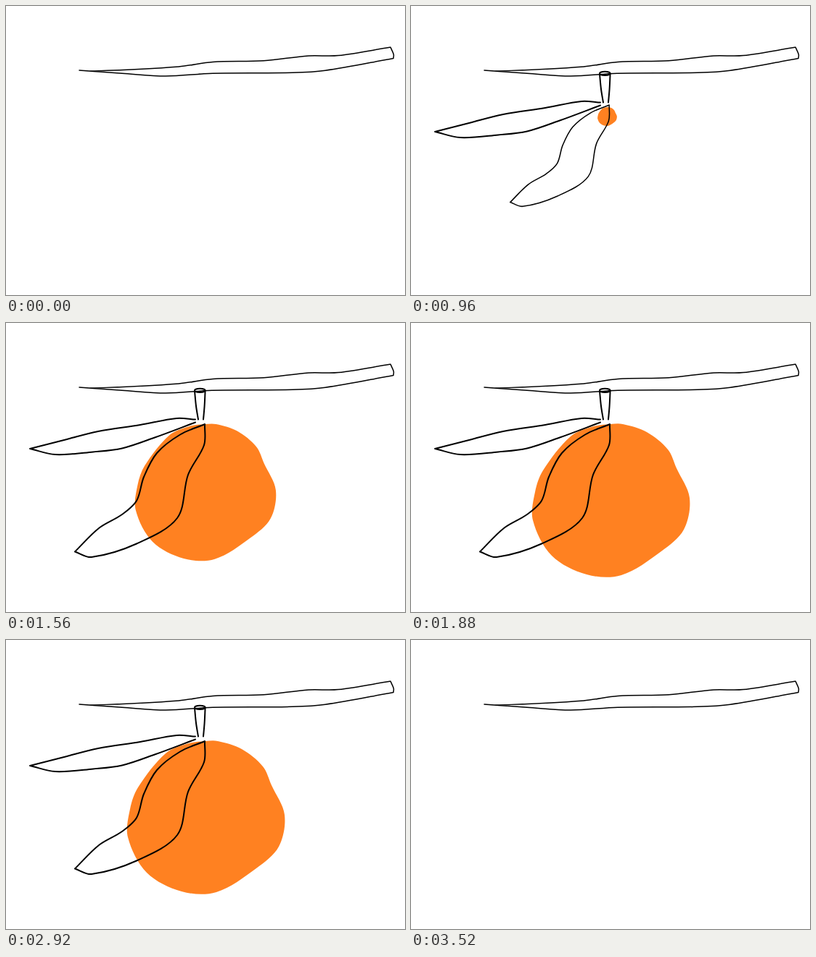
An HTML page that plays this animation: 550x400 px, repeating every 4 s.

```html
<!DOCTYPE html>
<html lang="en">
<head>
<meta charset="utf-8">
<title>Orange on a branch</title>
<style>
  html, body { margin: 0; width: 100%; height: 100%; overflow: hidden; background: #fff; }
  svg { display: block; width: 550px; height: 400px; }
  g { fill: none; stroke: #000; stroke-linecap: round; stroke-linejoin: round; }
  #branch { stroke-width: 1.5; }
  #orange { fill: #ff8121; stroke: none; }
</style>
</head>
<body>
<svg viewBox="0 0 550 400">
  <g>
    <path id="branch"/>
    <g id="fruit">
      <path id="orange"/>
      <g id="stem">
        <ellipse cx="267.3" cy="93.3" rx="7.3" ry="2.6"/>
        <path id="twig"/>
      </g>
      <path id="leaf"/>
    </g>
  </g>
</svg>
<script>
const STEP = 40, STEPS = 100;
const SHAKE = 65, REST = 73, FALL = 81, GONE = 88;
const $ = id => document.getElementById(id);

// Smooth curve through key points; handles follow the length of each span.
function curve(points, closed) {
  const p = points.trim().split(/\s+/).map(s => s.split(',').map(Number));
  const n = p.length;
  const at = i => closed ? p[(i + n) % n] : p[Math.max(0, Math.min(n - 1, i))];
  const dist = (a, b) => Math.hypot(a[0] - b[0], a[1] - b[1]);
  const handle = (prev, from, to) => {
    const span = dist(from, to);
    const k = span / (span + dist(prev, from)) / 3;
    return from.map((v, j) => v + (to[j] - prev[j]) * k);
  };
  let d = 'M' + p[0];
  for (let i = 0; i < (closed ? n : n - 1); i++) {
    const [a, b, c, e] = [at(i - 1), at(i), at(i + 1), at(i + 2)];
    d += `C${handle(a, b, c)} ${handle(e, c, b)} ${c}`;
  }
  return d;
}

const shape = (id, ...strokes) => $(id).setAttribute('d', strokes.map(s => curve(s)).join(''));

shape('branch',
  '101,89 122,90 238,84 285,77.4 355,75.8 417,69 458,68.6 530,57',
  '530,57 534.3,67 534,72.5',
  '101,89 160,93.2 220,97 285,93.2 395,92.3 440,89.3 534,72.5');

shape('twig',
  '260,94 262,115 265,133.5',
  '274.6,94 273.6,115 272,133.5',
  '261,133.5 235,132 185,141 127,150 80,162 33,174',
  '33,174 68,182 120,178.5 160,173.5 205,158.5 261,137.5');

shape('leaf',
  '274,140 240,154.5 208,180 190,213 180,246 160,265 128,284 95,316.5',
  '95,316.5 118,324 180,305.5 236,270 251,210 273,169 274,140');

$('orange').setAttribute('d', curve(`275,140 292,140 325,151 354,175 366,201 384,242 376,286
  345,316 290,349 242,348 194,322 168,273 171,234 182,204 220,157 250,143.5`, true));

const parts = [
  { id: 'stem', from: 0, to: 19, min: 0.008, x: 267, y: 93, ease: u => 0.8 * u + 0.2 * u * u },
  { id: 'leaf', from: 15, to: 27, min: 0.05, x: 270.6, y: 127.4, ease: u => u },
  { id: 'orange', from: 23, to: 47, min: 0.045, x: 269.8, y: 140, ease: u => 1 - (1 - u) ** 2 }
];

function grow({ id, from, to, min, x, y, ease }, k) {
  const u = Math.max(0, Math.min(1, (k - from) / (to - from)));
  const s = min + (1 - min) * ease(u);
  const el = $(id);
  el.style.display = k < from ? 'none' : '';
  el.setAttribute('transform', `translate(${x} ${y}) scale(${s}) translate(${-x} ${-y})`);
  // Lines stay about one pixel wide while small.
  el.style.strokeWidth = Math.max(2, Math.min(1 / s, 12));
}

function offset(k) {
  if (k >= FALL) return [0, 340 * ((k - FALL + 1) / (GONE - FALL)) ** 2];
  if (k < SHAKE || k >= REST) return [0, 0];
  const a = 2.4 * (k - SHAKE);
  return [-1.6 + 4 * Math.cos(a), 3.5 + 2.5 * Math.sin(a)];
}

function draw(k) {
  parts.forEach(part => grow(part, k));
  $('fruit').setAttribute('transform', `translate(${offset(k)})`);
  $('fruit').style.display = k >= GONE ? 'none' : '';
}

const start = performance.now();
function tick() {
  draw(Math.floor((performance.now() - start) / STEP) % STEPS);
  requestAnimationFrame(tick);
}
tick();
</script>
</body>
</html>
```
